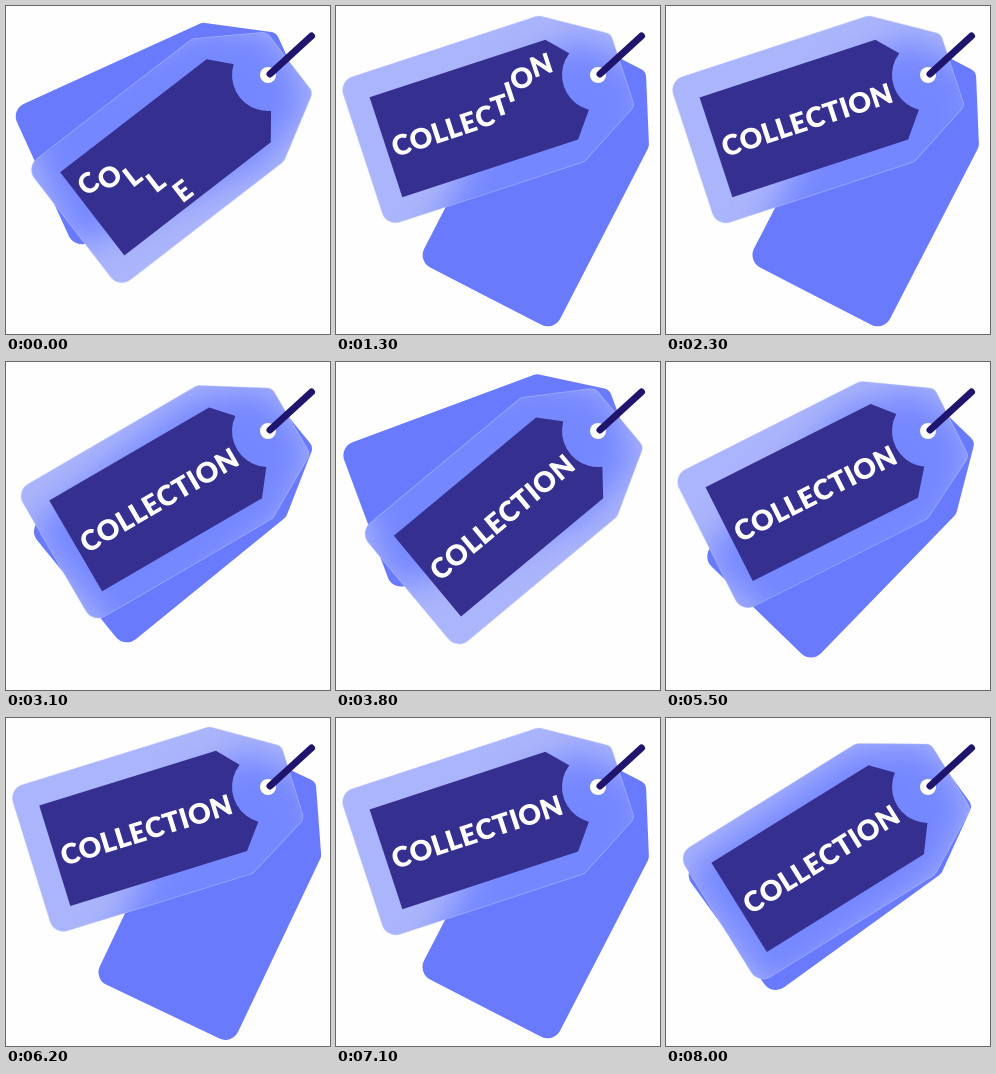
An HTML page with a canvas that plays this animation: 324 by 328 pixels, repeating every 8100 ms.

```html
<!DOCTYPE html>
<html lang="en">
<head>
<meta charset="utf-8">
<title>Collection tag</title>
<style>
html, body { margin: 0; width: 100%; height: 100%; overflow: hidden; background: #fefefe; }
canvas { display: block; }
</style>
</head>
<body>
<canvas id="stage" width="324" height="328"></canvas>
<script>
const ctx = document.getElementById('stage').getContext('2d');
const LOOP = 8100, SWING = 4800, PEAK = 1800, STAGGER = 118;
const HOLE = [262, 69];
const WORD = 'COLLECTION', TEXT_X = -218, TEXT_WIDTH = 178, TEXT_Y = 15;
const FONT = '900 28px Lato, Inter, sans-serif';

// Outlines are relative to the hole, pointing right: [x, y, corner radius]
const tag = rounded([
  [-248, -75, 14], [-38, -75, 10], [25, -35, 9],
  [25, 41, 9], [-40, 78, 10], [-248, 78, 14]
]);
const label = new Path2D();
label.moveTo(-224, -50);
label.lineTo(-39, -50);
label.lineTo(-21, -30);
label.arc(0, 0, 36, Math.atan2(-30, -21), Math.atan2(31, -20), true);
label.lineTo(-39, 55);
label.lineTo(-224, 55);
label.closePath();

function rounded(points) {
  const path = new Path2D();
  path.moveTo(points[0][0], 0);
  points.forEach(([x, y, r], i) => {
    const [nx, ny] = points[(i + 1) % points.length];
    path.arcTo(x, y, nx, ny, r);
  });
  path.closePath();
  return path;
}

function turned(degrees, draw) {
  ctx.save();
  ctx.translate(...HOLE);
  ctx.rotate(-degrees * Math.PI / 180);
  draw();
  ctx.restore();
}

function fill(path, color) {
  ctx.fillStyle = color;
  ctx.fill(path);
}

// Each letter shoots up from below, overshoots and settles
function lift(u) {
  if (u < -5) return 65;
  if (u < 1.5) return -33 + 98 * ((1.5 - u) / 6.5) ** 2.2;
  if (u < 6.5) return -16.5 * (1 + Math.cos(Math.PI * (u - 1.5) / 5));
  return 0;
}

function drawWord(t) {
  ctx.font = FONT;
  ctx.fillStyle = '#fff';
  const widths = [...WORD].map(c => ctx.measureText(c).width);
  const total = widths.reduce((a, b) => a + b);
  const gap = (TEXT_WIDTH - total) / (WORD.length - 1);
  let x = TEXT_X;
  widths.forEach((w, i) => {
    ctx.fillText(WORD[i], x, TEXT_Y + lift(t / STAGGER - i));
    x += w + gap;
  });
}

function draw(t) {
  const swing = Math.cos(2 * Math.PI * (t - PEAK) / SWING);
  const back = 42.5 + 25.5 * swing, front = 28.5 - 13 * swing;

  ctx.fillStyle = '#fefefe';
  ctx.fillRect(0, 0, 324, 328);
  turned(back, () => fill(tag, '#6a7afd'));

  // Frosted front: the back tag shows through, blurred
  turned(front, () => {
    fill(tag, '#abb5fb');
    ctx.clip(tag);
    ctx.rotate((front - back) * Math.PI / 180);
    ctx.filter = 'blur(16px)';
    fill(tag, '#7587ff');
  });

  turned(front, () => {
    ctx.strokeStyle = 'rgba(190,202,255,.35)';
    ctx.lineWidth = 1;
    ctx.stroke(tag);
    fill(label, '#352f90');
    ctx.clip(label);
    drawWord(t);
  });

  ctx.fillStyle = '#fff';
  ctx.beginPath();
  ctx.arc(...HOLE, 8, 0, 7);
  ctx.fill();
  ctx.strokeStyle = '#20156c';
  ctx.lineWidth = 7;
  ctx.lineCap = 'round';
  ctx.beginPath();
  ctx.moveTo(264, 68);
  ctx.lineTo(305.5, 30);
  ctx.stroke();
}

const start = performance.now();
function frame() {
  draw((performance.now() - start) % LOOP);
  requestAnimationFrame(frame);
}
frame();
</script>
</body>
</html>
```
